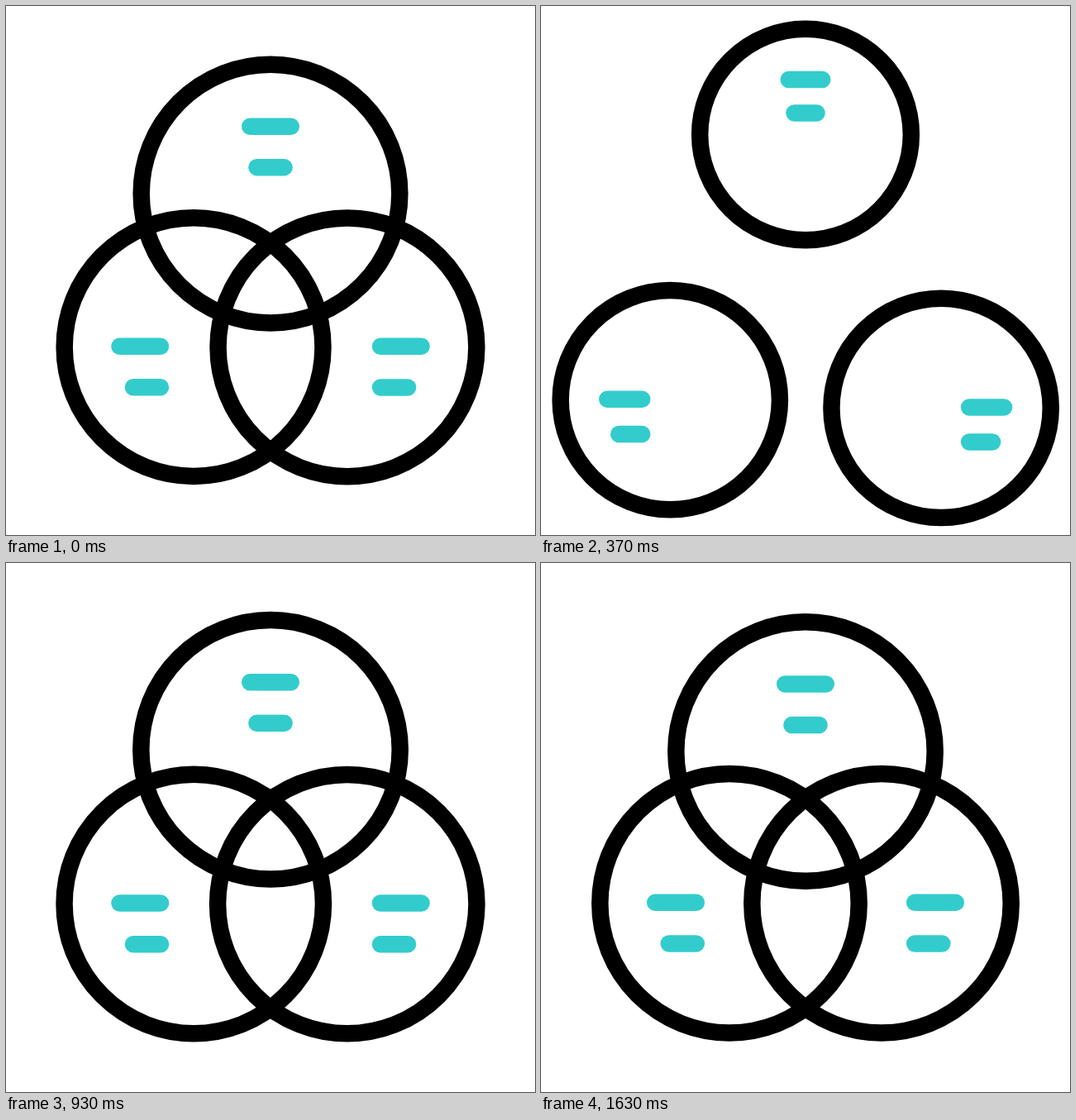
An HTML page with a canvas for the animation above (1.67 s loop, 640 by 640 pixels).

```html
<!DOCTYPE html>
<html lang="en">
<head>
<meta charset="utf-8">
<title>Three circles</title>
<style>
  html, body { margin: 0; width: 100%; height: 100%; overflow: hidden; background: #fff; }
  canvas { display: block; width: 100vw; height: 100vh; }
</style>
</head>
<body>
<canvas></canvas>
<script>
const SIZE = 640, LOOP = 1670, STEPS = 50;
const RADIUS = 156.7, STROKE = 20.5;
const BLACK = '#000', TEAL = '#33cccc';

// Bars are [x1, x2, y] relative to the circle's centre.
const circles = [
  { rest: [320, 228], shift: [0, -79.3], shrink: 32.4, back: 15.8,
    bars: [[-24.8, 24.8, -81.5], [-16.6, 16.6, -32]] },
  { rest: [228, 411.8], shift: [-78.5, 71], shrink: 27, back: 15,
    bars: [[-89.8, -40.2, -1], [-73.3, -40.2, 48.7]] },
  { rest: [412, 411.8], shift: [78.9, 81.6], shrink: 27, back: 15,
    bars: [[40.2, 89.8, -1], [40.2, 73.3, 48.7]] }
];

// Diagonal stripes: x + y is constant, x - y runs from one end to the other.
const stripes = [[531, -137, 15], [618, -126, 88], [705, -195, 193], [791, -227, -16]];

const canvas = document.querySelector('canvas');
const ctx = canvas.getContext('2d');
const ratio = window.devicePixelRatio || 1;
canvas.width = canvas.height = SIZE * ratio;

const clamp = v => Math.min(1, Math.max(0, v));

// Cubic Bezier easing with handles (.35, 0) and (.61, 1).
function ease(value) {
  const x = clamp(value);
  let low = 0, high = 1;
  for (let i = 0; i < 24; i++) {
    const s = (low + high) / 2, r = 1 - s;
    if (3 * r * r * s * 0.35 + 3 * r * s * s * 0.61 + s ** 3 < x) low = s;
    else high = s;
  }
  return low * low * (3 - 2 * low);
}

const span = (step, start, length) => ease((step - start) / length);
const outAndBack = (step, out, back) => span(step, 0, out) - span(step, out, back);

function line(x1, y1, x2, y2) {
  ctx.beginPath();
  ctx.moveTo(x1, y1);
  ctx.lineTo(x2, y2);
  ctx.stroke();
}

function disc([x, y], radius) {
  ctx.beginPath();
  ctx.arc(x, y, radius, 0, Math.PI * 2);
}

function drawStripes(step) {
  const head = span(step, 31, 10), tail = span(step, 41, 9);
  if (head <= tail) return;
  ctx.strokeStyle = TEAL;
  circles.forEach((circle, i) => {
    ctx.save();
    for (const { rest } of [circle, circles[(i + 1) % 3]]) {
      disc(rest, RADIUS);
      ctx.clip();
    }
    for (const [sum, from, to] of stripes) {
      const a = from + (to - from) * tail, b = from + (to - from) * head;
      line((sum + a) / 2, (sum - a) / 2, (sum + b) / 2, (sum - b) / 2);
    }
    ctx.restore();
  });
}

function drawCircle({ rest, shift, shrink, back, bars }, step) {
  const move = outAndBack(step, 15, back);
  const [x, y] = rest.map((v, i) => v + shift[i] * move);
  const radius = RADIUS - shrink * outAndBack(step, 15.5, 13);
  const scale = radius / RADIUS;
  ctx.strokeStyle = TEAL;
  for (const [x1, x2, dy] of bars)
    line(x + x1 * scale, y + dy * scale, x + x2 * scale, y + dy * scale);
  ctx.strokeStyle = BLACK;
  disc([x, y], radius);
  ctx.stroke();
}

function draw(time) {
  // Thirty poses a second, changing on ten-millisecond marks.
  const tick = Math.floor((time % LOOP) / 10) * 10;
  const step = (Math.floor((tick + 3.4) * 0.03) + 1) % STEPS;
  ctx.setTransform(ratio, 0, 0, ratio, 0, 0);
  ctx.fillStyle = '#fff';
  ctx.fillRect(0, 0, SIZE, SIZE);
  ctx.lineWidth = STROKE;
  ctx.lineCap = 'round';
  drawStripes(step);
  circles.forEach(circle => drawCircle(circle, step));
}

const start = performance.now();
function loop() {
  draw(performance.now() - start);
  requestAnimationFrame(loop);
}
loop();
</script>
</body>
</html>
```
